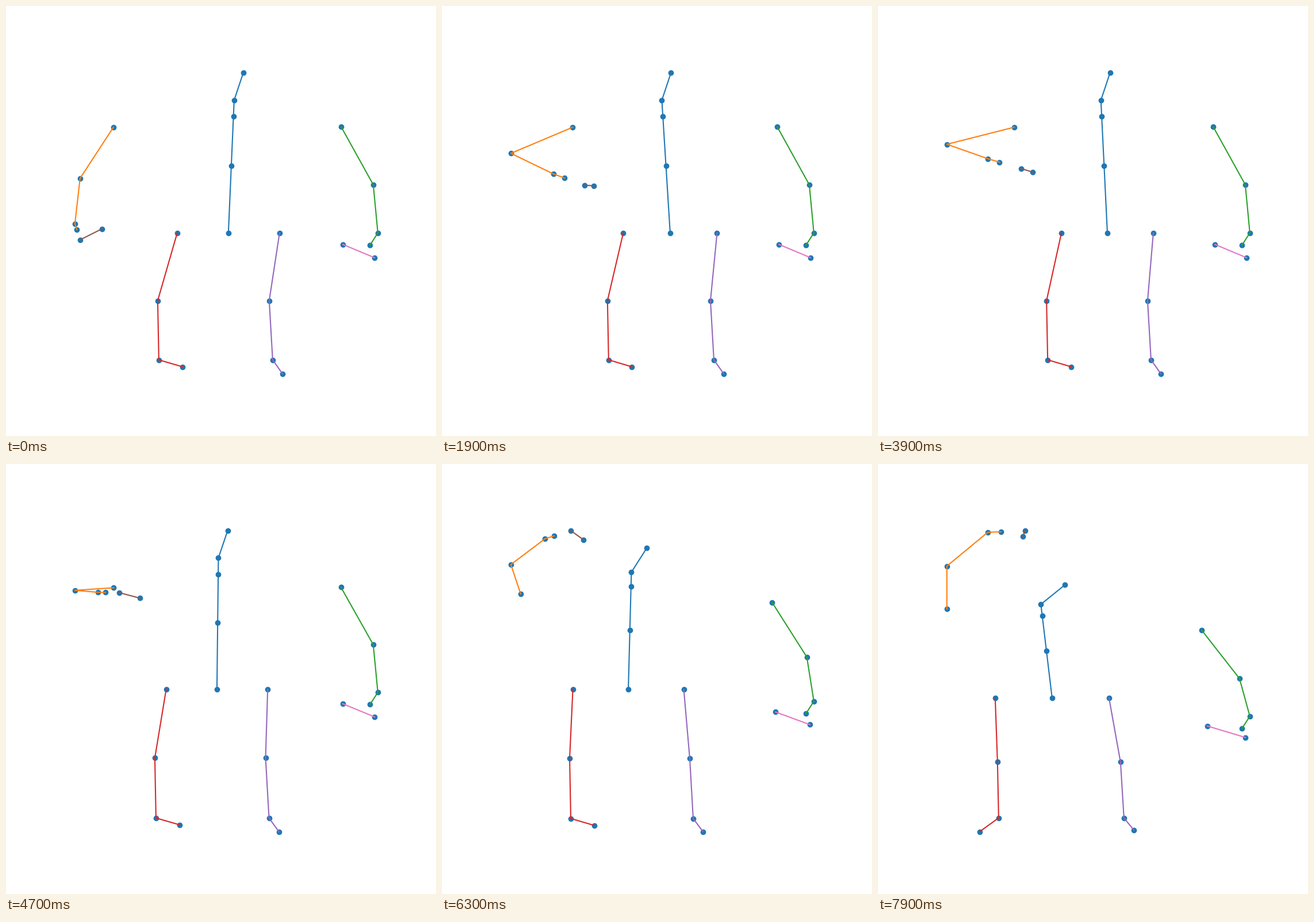
Write a matplotlib script that moves like this. It is 748 px wide and 748 px high and loops after 8 s.

```python
import numpy as np
import matplotlib.pyplot as plt
from matplotlib.animation import FuncAnimation

SIZE, DPI = 748, 100
FRAMES, STEP = 80, 100
BEAT = 2.8  # seconds per arm swing


def ramp(t, start, end):
    return np.clip((t - start) / (end - start), 0, 1)


def ease(t, start, end):
    u = ramp(t, start, end)
    return u * u * (3 - 2 * u)


def bump(t, center):
    return np.exp(-((t - center) / 0.35) ** 2)


def skeleton(t):
    """Joint chains at t seconds, as complex points with y downwards."""
    lift = ease(t, 3.9, 5.6)                 # left arm goes overhead
    crouch = ease(t, 5.0, 7.9)               # upper body shortens
    walk = 1 - (1 - ramp(t, 3.9, 7.9)) ** 1.5  # body drifts to the left
    beat = np.cos(np.pi * t / BEAT)
    sway = beat * (1 - lift)
    swing = np.sin(np.pi * t / BEAT) ** 2 * (1 - lift)
    flip = bump(t, 1.1) + bump(t, 7.9)       # left foot turns outwards

    # spine: leans around the hips
    hip = 387 + 13 * swing - 84 * walk + 1j * (395 - 12 * lift + 26 * crouch)
    heights = np.array([231, 231, 202.5, 117, 0])
    spine = hip + (16 * beat - 6) * heights / 231 - 1j * heights * (1 - 0.29 * crouch)
    spine[0] += 16 + 26 * crouch - 48j * (1 - 0.29 * crouch)

    # left arm: swings twice, then stays raised
    shoulder = 187 + 55 * swing - 67 * walk + 1j * (211 + 42 * crouch)
    elbow = (124 + 5 * sway - 4 * swing - 4 * lift
             + 1j * (309 - 9 * sway - 80 * swing - 131 * lift))
    wrist = (156 - 36 * sway + 25 * swing + 15 * lift + 20 * crouch
             + 1j * (389 - 10 * sway - 142 * swing - 245 * lift - 25 * crouch))
    reach = (20 - 11 * sway + 39 * swing + 10 * lift + 35 * crouch
             + 1j * (28 - 12 * swing - 50 * lift + 19 * crouch))
    spread = (24 + 14 * sway + 17 * lift - 45 * crouch
              + 1j * (-19 + 28 * swing + 39 * lift - 10 * crouch))
    left_arm = [shoulder, elbow, wrist, wrist + 0.35 * reach]
    left_tips = [wrist + reach, wrist + reach + spread]

    # right arm: hangs and sinks with the crouch
    right_arm = np.array([583 + 210j, 639 + 311j, 647 + 395j, 633.5 + 416j])
    right_arm += crouch * np.array([-20 + 80j, -10 + 64j, 46j, 46j])
    right_tips = np.array([641 + 438j, 586 + 415j])
    right_tips += crouch * np.array([-2 + 40j, -13 + 43j])

    # legs: mirrored around the hips and the feet
    feet = 365 + 22 * swing - 46 * walk + 1j * (616 + 3 * crouch)
    width = 89 - 10 * swing + 10 * walk
    knee_y = hip.imag + 0.534 * (feet - hip).imag

    def leg(side, toe):
        ankle = feet + side * (width + 10)
        knee = feet.real - 4 + side * (width + 8) + 1j * knee_y
        return [hip + side * width, knee, ankle, ankle + toe]

    left_leg = leg(-1, 41 - 74 * flip + 12j * (1 + flip))
    right_leg = leg(1, 17 + 1j * (24 - 3 * crouch))
    return [spine, left_arm, right_arm, left_leg, right_leg, left_tips, right_tips]


def fit(chains):
    """Scale all joints to the unit square."""
    z = np.concatenate(chains)
    pts = np.column_stack([z.real, z.imag])
    low, high = pts.min(axis=0), pts.max(axis=0)
    return (pts - low) / (high - low)


fig = plt.figure(figsize=(SIZE / DPI, SIZE / DPI), dpi=DPI, facecolor="white")
ax = fig.add_axes([0.125, 0.11, 0.775, 0.77])
ax.set_xlim(-0.05, 1.05)
ax.set_ylim(1.05, -0.05)
ax.axis("off")

first = skeleton(0)
cuts = np.cumsum([len(chain) for chain in first])[:-1]
dots = ax.scatter(*fit(first).T, s=36, lw=1, color="C0")
lines = [ax.plot([], [], color=f"C{n}", lw=1.5)[0] for n in range(len(first))]


def draw(i):
    pts = fit(skeleton(i * STEP / 1000))
    dots.set_offsets(pts)
    for line, part in zip(lines, np.split(pts, cuts)):
        line.set_data(*part.T)
    return [dots, *lines]


anim = FuncAnimation(fig, draw, frames=FRAMES, interval=STEP,
                     init_func=lambda: draw(0), repeat=True, repeat_delay=0)
plt.show()
```
